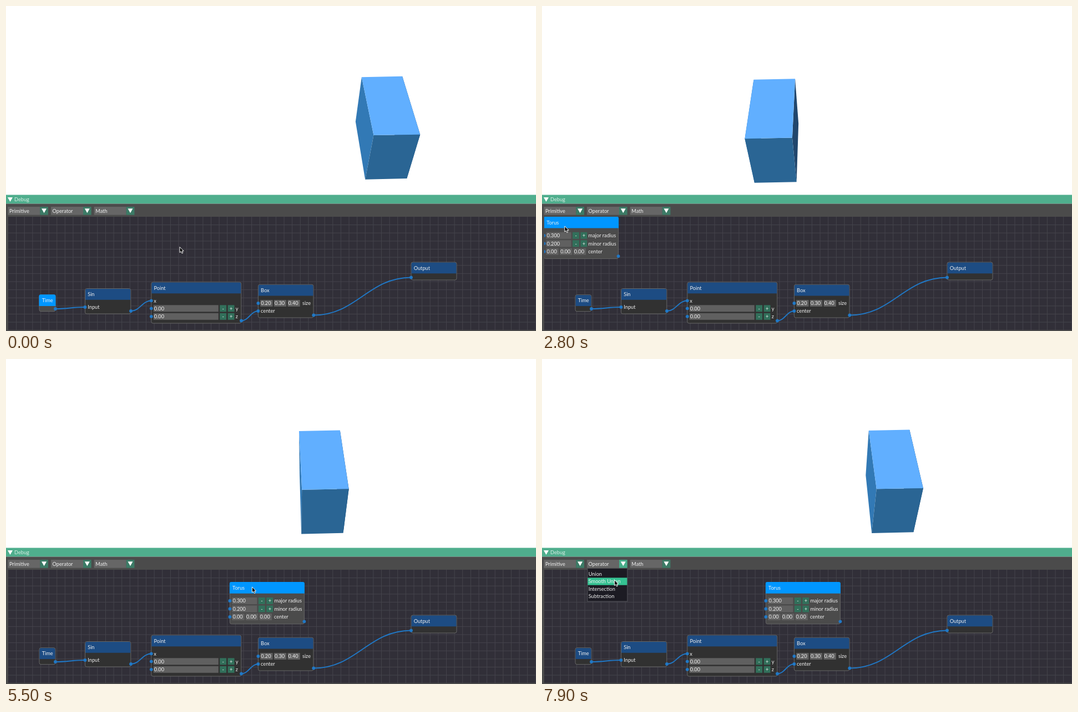
Animation of 955x586 px, one loop 8000 ms. Source, as an HTML page with a canvas:

```html
<!DOCTYPE html>
<html>
<head>
<meta charset="utf-8">
<style>
html, body { margin: 0; width: 100%; height: 100%; overflow: hidden; background: #fff; }
canvas { display: block; }
</style>
</head>
<body>
<canvas id="stage" width="955" height="586"></canvas>
<script>
const g = document.getElementById('stage').getContext('2d');
const LOOP = 8, FONT = '9.2px Lato, sans-serif';
const GREEN = '#3c7b66', LIT = '#47ad8a', PIN = '#2078c6';

function rect(x, y, w, h, color) {
  g.fillStyle = color;
  g.fillRect(x, y, w, h);
}

function text(str, x, y, color = '#f0f0f0') {
  g.fillStyle = color;
  g.fillText(str, x, y + 3.2);
}

function poly(points, color, line) {
  g.beginPath();
  points.forEach(p => g.lineTo(p[0], p[1]));
  g.closePath();
  g.fillStyle = color;
  g.fill();
  if (line) {
    g.strokeStyle = line;
    g.lineWidth = 1;
    g.stroke();
  }
}

function arrow(x, y) {
  poly([[x, y], [x + 9, y], [x + 4.5, y + 8]], '#fff');
}

function pin(x, y) {
  g.beginPath();
  g.arc(x, y, 2.9, 0, 7);
  g.fillStyle = PIN;
  g.fill();
}

// Eased position on a list of [time, x, y] keys.
function follow(keys, t) {
  let i = 0;
  while (i < keys.length - 2 && t > keys[i + 1][0]) i++;
  const [t0, x0, y0] = keys[i], [t1, x1, y1] = keys[i + 1];
  let k = Math.min(1, Math.max(0, (t - t0) / (t1 - t0)));
  k *= k * (3 - 2 * k);
  return [x0 + (x1 - x0) * k, y0 + (y1 - y0) * k];
}

// Solid corners at the left end of the swing, and how far each one travels.
const CORNERS = [
  [306, 134, 372, -6.5], [381, 132.5, 370, -6.5], [365, 239, 423.5, -8], [279, 241, 426, -9],
  [306, 320.5, 379, -8.5], [382, 319, 378, -9], [331, 214, 332, -6], [395, 213, 331, -6]
];
const FACES = [['#3279b5', 0, 3, 4, 6], ['#21466c', 1, 2, 5, 7], ['#2a6594', 3, 2, 5, 4], ['#61afff', 0, 1, 2, 3]];

function solid(t) {
  const phase = t - 0.594 - 0.05 * Math.max(0, 1 - t / 2);
  const s = (1 + Math.cos(phase)) / 2;
  const at = CORNERS.map(([x, y, dx, dy]) => [x + dx * s, y + dy * s]);
  for (const [color, ...ids] of FACES) {
    const face = ids.map(i => at[i]);
    poly(face, color);
  }
}

function box(x, y, w, h, radii) {
  g.beginPath();
  g.roundRect(x, y, w, h, radii);
}

function node(title, x, y, w, h, active) {
  box(x, y, w, h, 3);
  g.fillStyle = active ? '#4b4b4b' : '#313131';
  g.fill();
  g.strokeStyle = '#666';
  g.lineWidth = 1;
  g.stroke();
  const edge = active ? 0.5 : -0.5;
  box(x - edge, y - edge, w + 2 * edge, 20.3 + edge, [3, 3, 0, 0]);
  g.fillStyle = active ? '#0096ff' : '#1d4c83';
  g.fill();
  text(title, x + 4.7, y + 10.3);
}

function field(value, x, y, w) {
  rect(x, y - 6, w, 12, '#606060');
  text(value, x + 1, y);
}

function vector(values, x, y, label) {
  values.forEach((v, i) => field(v, x + i * 24.6, y, 22.3));
  text(label, x + 75.6, y);
}

function stepper(value, x, y, w, label) {
  field(value, x, y, w);
  ['-', '+'].forEach((sign, i) => {
    const bx = x + w + 2.5 + i * 14.4;
    rect(bx, y - 6, 11.8, 12, '#32705b');
    g.textAlign = 'center';
    text(sign, bx + 6, y);
    g.textAlign = 'left';
  });
  text(label, x + w + 31, y);
}

function link(x0, y0, x1, y1) {
  const d = (x1 - x0) * 0.44;
  g.beginPath();
  g.moveTo(x0, y0);
  g.bezierCurveTo(x0 + d, y0, x1 - d, y1, x1, y1);
  g.strokeStyle = PIN;
  g.lineWidth = 1.9;
  g.stroke();
  pin(x0, y0);
  pin(x1, y1);
}

function torus(x, y) {
  node('Torus', x, y, 134, 75.3, true);
  stepper('0.300', x + 4, y + 33.5, 45, 'major radius');
  stepper('0.200', x + 4, y + 48, 45, 'minor radius');
  vector(['0.00', '0.00', '0.00'], x + 4, y + 62.5, 'center');
  [33.5, 48, 62.5].forEach(dy => pin(x, y + dy));
  pin(x + 134, y + 70.8);
}

function graph(t) {
  g.save();
  g.beginPath();
  g.rect(4, 380, 951, 204);
  g.clip();
  rect(4, 380, 951, 204, '#312f38');
  for (let i = 1; i < 66; i++) {
    rect(3.5 + i * 14.62, 380, 1, 204, '#45444c');
    if (i < 14) rect(4, 379.5 + i * 14.62, 951, 1, '#45444c');
  }
  node('Time', 60, 520.7, 29, 30, t < MADE);
  node('Sin', 142.5, 509.5, 82.3, 45.5);
  text('Input', 147.3, 543);
  node('Point', 261.8, 498, 162, 74);
  text('x', 266.3, 531.5);
  stepper('0.00', 265.8, 545.3, 117, 'y');
  stepper('0.00', 265.8, 559.8, 117, 'z');
  pin(261.8, 545.3);
  pin(261.8, 559.8);
  node('Box', 454.4, 502.2, 99.6, 59.8);
  vector(['0.20', '0.30', '0.40'], 458.3, 536, 'size');
  text('center', 459, 550);
  pin(454.4, 536);
  node('Output', 730, 462, 82, 32);
  link(89, 546, 142.5, 543);
  link(225, 550, 261.8, 531.3);
  link(424, 567.5, 454.4, 550);
  link(554.3, 557.5, 730, 489.5);
  if (t >= MADE) torus(...follow(DRAG, t));
  g.restore();
}

function combo(label, x, lit) {
  rect(x, 362, 58, 14.7, '#666');
  rect(x + 58, 362, 14.7, 14.7, lit ? LIT : GREEN);
  text(label, x + 2.6, 369.3);
  arrow(x + 60.8, 365.3);
}

function menu(items, chosen, x, mouse) {
  rect(x, 377.5, 73, 60, '#54545a');
  rect(x + 1, 378, 71, 58.5, '#1c1b23');
  items.forEach((item, i) => {
    const y = 381 + i * 13.35;
    const over = mouse[1] >= y && mouse[1] < y + 13.35 && mouse[0] > x && mouse[0] < x + 72;
    if (over || i === chosen) rect(x + 1, y, 71, 13.35, over ? '#35c292' : '#23795f');
    text(item, x + 2.3, y + 6.6);
  });
}

function pointer(x, y) {
  const shape = [[0, 0], [0, 10], [2.3, 8], [4, 11.5], [5.8, 10.7], [4.2, 7.3], [7.2, 7.2]];
  poly(shape.map(p => [x + p[0], y + p[1]]), '#000', '#fff');
}

const MADE = 2.6, GRAB = 3.7;
const DRAG = [[GRAB, 3.6, 380.3], [4.55, 386, 404.5], [4.7, 390, 403.8], [5.3, 403.4, 402.5]];
const BEFORE = [[0.1, 313, 434.5], [0.9, 36, 384], [1.5, 66.5, 374.5], [2, 66.5, 374.5], [2.4, 40, 400],
  [MADE, 40, 400], [3.2, 43.3, 388.8]];
const AFTER = [[5.6, 443.5, 411], [6.4, 145.5, 374.5], [7.3, 145.5, 374.5], [7.7, 130.5, 398.5]];

function mouseAt(t) {
  if (t < GRAB) return follow(BEFORE, t);
  if (t > 5.6) return follow(AFTER, t);
  const [x, y] = follow(DRAG, t);
  return [x + 40, y + 8.5];
}

function draw(t) {
  const mouse = mouseAt(t);
  const over = x => mouse[0] > x + 58 && mouse[0] < x + 73 && mouse[1] > 362 && mouse[1] < 377;
  const primitives = t >= 1.7 && t < MADE, operators = t >= 7;
  rect(0, 0, 955, 586, '#fff');
  g.font = FONT;
  solid(t);
  rect(0, 340.5, 955, 16, '#4fae8d');
  arrow(3, 345);
  text('Debug', 15, 348.8, '#d8eee5');
  rect(0, 356.5, 955, 229.5, '#4b4b4b');
  graph(t);
  combo('Primitive', 3.3, primitives || over(3.3));
  combo('Operator', 81, operators || over(81));
  combo('Math', 158.7, false);
  if (primitives) menu(['Sphere', 'Torus', 'Box', 'Cylinder'], 2, 3.7, mouse);
  if (operators) menu(['Union', 'Smooth Union', 'Intersection', 'Subtraction'], 1, 81.4, mouse);
  pointer(...mouse);
}

function frame(now) {
  draw(now / 1000 % LOOP);
  requestAnimationFrame(frame);
}
requestAnimationFrame(frame);
</script>
</body>
</html>
```
